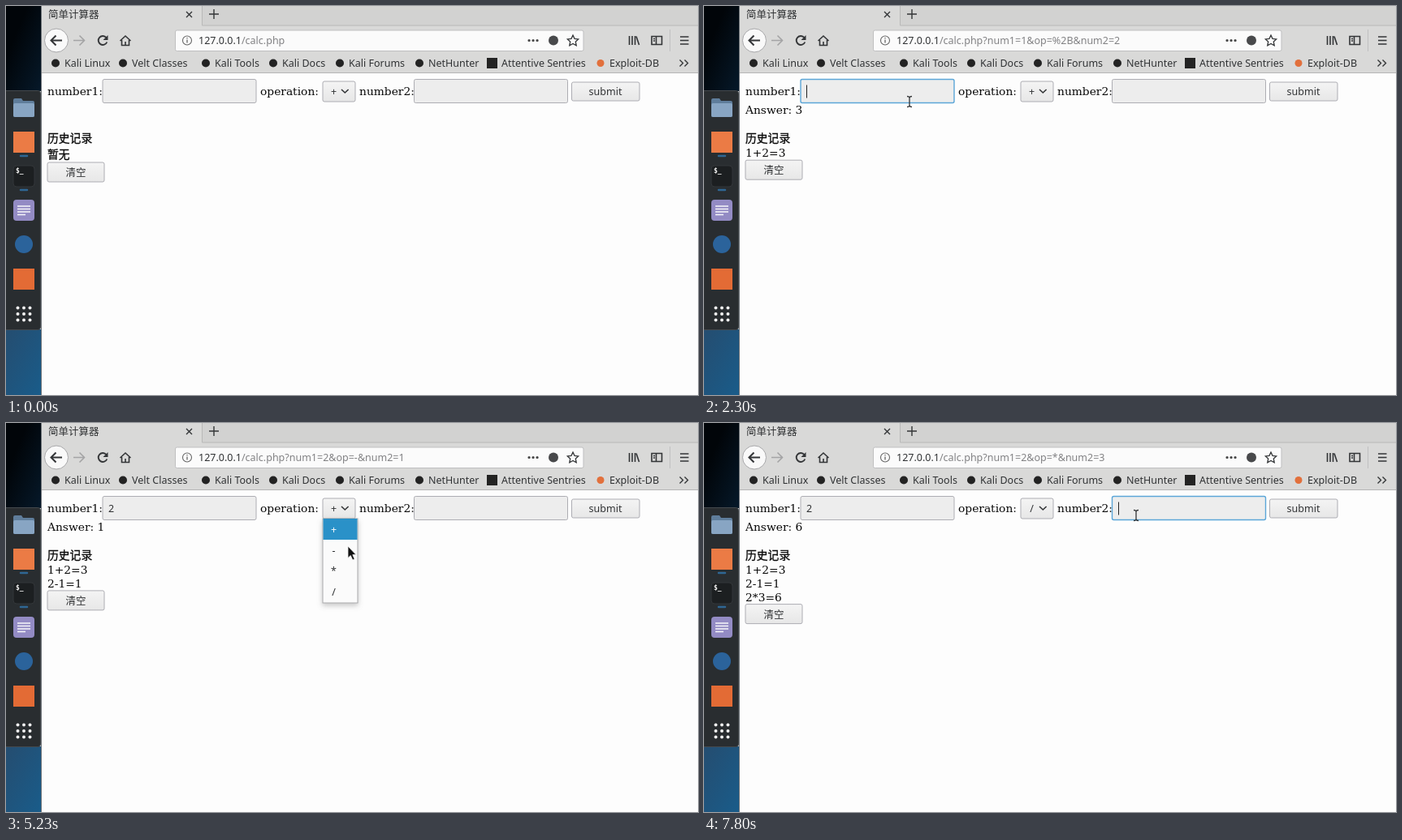
Recreate the animation shown at these times as an HTML page. Size 852 px wide and 480 px high, loop 8 s.

```html
<!DOCTYPE html>
<html lang="zh">
<head>
<meta charset="utf-8">
<title>简单计算器</title>
<style>
  html, body { margin: 0; width: 100%; height: 100%; overflow: hidden; background: #fdfdfd; }
  svg { display: block; width: 100vw; height: 100vh; }
  text { font: 12.5px "Noto Sans", "Noto Sans CJK SC", "Noto Sans CJK", sans-serif; fill: #303234; white-space: pre; }
  .page { font: 13.8px "DejaVu Serif", "Noto Sans CJK SC", "Noto Sans CJK", serif; fill: #080808; }
  .cjk { font: 13.8px "Noto Sans CJK SC", "Noto Sans CJK", sans-serif; fill: #080808; stroke: #080808; stroke-width: .3; }
  .mid { text-anchor: middle; }
  .line { fill: none; stroke: #333537; stroke-width: 1.6; }
  .box { fill: url(#btn); stroke: #adadb3; }
  .field { fill: #ededed; stroke: #adadb3; }
  .field.on { stroke: #5ba6d8; stroke-width: 1.4; }
  .caret { stroke: #222; stroke-width: 1; }
</style>
</head>
<body>
<svg viewBox="0 0 852 480" preserveAspectRatio="none">
  <defs>
    <linearGradient id="wall" x1="0" y1="0" x2="1" y2="1">
      <stop offset="0" stop-color="#254d70"/><stop offset="1" stop-color="#195c8a"/>
    </linearGradient>
    <linearGradient id="night" x1="0" y1="0" x2="1" y2="1">
      <stop offset=".3" stop-color="#010509"/><stop offset="1" stop-color="#06192a"/>
    </linearGradient>
    <linearGradient id="btn" x1="0" y1="0" x2="0" y2="1">
      <stop offset="0" stop-color="#f4f4f4"/><stop offset="1" stop-color="#e7e7e7"/>
    </linearGradient>
    <filter id="glow" x="-20%" y="-40%" width="140%" height="220%">
      <feDropShadow dx="0" dy="3" stdDeviation="3" flood-color="#777" flood-opacity=".4"/>
    </filter>
  </defs>

  <!-- desktop and dock -->
  <rect width="44" height="105" fill="url(#night)"/>
  <rect y="399" width="44" height="81" fill="url(#wall)"/>
  <rect x="-4" y="104.500" width="46.500" height="295" rx="3" fill="#292d30" stroke="#44494d"/>
  <path d="M9 116q0-2 2-2h8l2 3h12q2 0 2 2v16q0 2-2 2h-22q-2 0-2-2z" fill="#5f7d9b"/>
  <rect x="9" y="120" width="26" height="17" rx="2" fill="#88a5c3"/>
  <rect x="9" y="155" width="26" height="26" fill="#eb7b45"/>
  <rect x="9" y="197" width="26" height="26" rx="4" fill="#1c1f21" stroke="#33373a"/>
  <text x="12" y="206" style="font:bold 8px 'DejaVu Sans Mono',monospace;fill:#f2f2f2">$_</text>
  <path d="M18 185h8M18 227h8" stroke="#2f6794" stroke-width="2.500" stroke-linecap="round"/>
  <rect x="9" y="239" width="26" height="26" rx="4" fill="#938bc4"/>
  <path d="M14 247h16M14 250.500h16M14 254h16M14 257.500h10" stroke="#f7f7fa" stroke-width="1.700"/>
  <circle cx="22" cy="294" r="11" fill="#2b639b"/>
  <rect x="9" y="324" width="26" height="26" fill="#e36b35"/>
  <g id="dots" fill="#f1f1f1"></g>

  <!-- browser frame -->
  <rect x="44" width="808" height="480" fill="#fdfdfd"/>
  <rect x="44" width="808" height="82" fill="#d9d9d8"/>
  <rect x="241" width="611" height="24" fill="#d2d2d1"/>
  <path d="M241.500 0V24H852" fill="none" stroke="#b8b8b8"/>
  <path d="M44 82.500H852" stroke="#b5b5b5"/>
  <path d="M43.500 0V480" stroke="#6f7479"/>
  <circle id="busy" cy="10" r="1.700" fill="#444"/>
  <text id="title" y="14.500">简单计算器</text>
  <path class="line" d="M222 7l7 7m0-7l-7 7M250 10h12m-6-6v12" style="stroke-width:1.400"/>

  <circle cx="62" cy="42.500" r="14.500" fill="#f9f9f9" stroke="#a8a8aa"/>
  <path class="line" d="M69 42.500H56m5.500-6l-6 6 6 6" style="stroke-width:2"/>
  <path class="line" d="M83 42.500h13m-5.500-6l6 6-6 6" style="stroke:#a4a4a5"/>
  <g id="reload"><path class="line" d="M123.500 39a5.500 5.500 0 1 0 .8 5.500" style="stroke-width:1.900"/><path d="M125.500 36v6h-6z" fill="#333537"/></g>
  <path id="spin" class="line" d="M115.500 46.500a5.500 5.500 0 1 1 7 0" style="stroke:#666"/>
  <path class="line" d="M140.500 43l6.500-6 6.500 6M142.500 42v6.500h9V42M147 48v-4"/>
  <rect x="208.500" y="30" width="502.500" height="25.500" rx="2" fill="#fbfbfb" stroke="#bfbfc0"/>
  <circle class="line" cx="223" cy="42.500" r="5.500" style="stroke:#666;stroke-width:1.100"/>
  <path class="line" d="M223 41.500v4M223 39v1.300" style="stroke:#666;stroke-width:1.300"/>
  <text x="237" y="47">127.0.0.1<tspan id="url" fill="#828284"></tspan></text>
  <path d="M644 42.500h.1m4.900 0h.1m4.900 0h.1" stroke="#444" stroke-width="3.200" stroke-linecap="round"/>
  <circle cx="674" cy="42.500" r="6" fill="#48494b"/>
  <path class="line" d="M698 36l2 4.300 4.700.6-3.400 3.200.9 4.700-4.200-2.300-4.200 2.300.9-4.700-3.400-3.200 4.700-.6z" style="stroke-width:1.300"/>
  <path class="line" d="M767.500 37v11M771 37v11M774.500 37v11M776 37.500l3.500 10.500"/>
  <path class="line" d="M795 37.500h12.500v10H795zM800.500 37.500v10M797 40.500h2M797 43h2"/>
  <path d="M817.500 29v27" stroke="#c0c0c0"/>
  <path class="line" d="M830 38h10.500M830 42.500h10.500M830 47h10.500"/>
  <g id="marks"></g>
  <path class="line" d="M829.500 66.500l4 4-4 4m6-8l4 4-4 4" style="stroke-width:1.400"/>

  <!-- form -->
  <text class="page" x="51" y="110">number1:</text>
  <text class="page" x="313" y="110">operation:</text>
  <text class="page" x="435" y="110">number2:</text>
  <rect id="f1" class="field" x="119" y="90.500" width="189" height="29" rx="2"/>
  <rect id="f2" class="field" x="502.500" y="90.500" width="189" height="29" rx="2"/>
  <text id="v1" x="126" y="110"></text>
  <text id="v2" x="510" y="110"></text>
  <path id="caret" class="caret" d="M0 97.500v16"/>
  <rect class="box" x="390" y="93" width="40" height="25" rx="2"/>
  <rect id="ring" x="392.500" y="95.500" width="35" height="20" fill="none" stroke="#999" stroke-dasharray="1 1"/>
  <text id="op" class="mid" x="403.500" y="110"></text>
  <path class="line" d="M413 103l4.300 4 4.300-4"/>
  <rect class="box" x="696.500" y="94" width="83.500" height="23" rx="2"/>
  <text class="mid" x="738" y="110">submit</text>

  <!-- results -->
  <text id="answer" class="page" x="51" y="133"></text>
  <text class="cjk" x="51" y="168">历史记录</text>
  <text id="none" class="cjk" x="51" y="188">暂无</text>
  <g id="history"></g>
  <g id="clear">
    <rect class="box" x="51" y="0" width="70" height="24" rx="2"/>
    <text class="mid" x="86" y="17">清空</text>
  </g>

  <g id="hint">
    <rect x="502.500" y="120" width="189" height="21" fill="#fcfcfc" stroke="#c2c2c4" filter="url(#glow)"/>
    <text id="hintText" x="509" y="136"></text>
  </g>
  <g id="menu">
    <rect x="390" y="118" width="43" height="104" fill="#fbfbfb" stroke="#a9a9ab" filter="url(#glow)"/>
    <rect id="pick" x="390.500" width="42" height="26" fill="#2a91c8"/>
  </g>

  <path id="arrow" d="M0 0V14.500L3.300 11.500 5.800 17 8.200 16 5.800 10.600H10z" fill="#111" stroke="#f4f4f4" stroke-width=".8"/>
  <path id="beam" class="line" d="M-3-6.500q3 0 3 2 0-2 3-2M0-5v10M-3 6.500q3 0 3-2 0 2 3 2" style="stroke-width:1.300"/>
</svg>
<script>
const LOOP = 8000;
const OPS = ['+', '-', '*', '/'];
const $ = id => document.getElementById(id);

function add(parent, tag, attrs, text = '') {
  const node = document.createElementNS('http://www.w3.org/2000/svg', tag);
  for (const key in attrs) node.setAttribute(key, attrs[key]);
  node.textContent = text;
  return $(parent).appendChild(node);
}
const show = (id, on) => { $(id).style.display = on ? '' : 'none'; };
const place = (id, x, y) => $(id).setAttribute('transform', `translate(${x} ${y})`);

for (let i = 0; i < 9; i++)
  add('dots', 'circle', { cx: 14.5 + i % 3 * 7.5, cy: 372.5 + Math.floor(i / 3) * 7.5, r: 2 });

const bookmarks = [[72, 'Kali Linux'], [155, 'Velt Classes'], [257, 'Kali Tools'], [340, 'Kali Docs'],
  [422, 'Kali Forums'], [520, 'NetHunter'], [610, 'Attentive Sentries'], [743, 'Exploit-DB']];
bookmarks.forEach(([x, name], i) => {
  if (i === 6) add('marks', 'rect', { x: x - 18, y: 64, width: 13, height: 13, fill: '#232323' });
  else add('marks', 'circle', { cx: x - 11, cy: 70.5, r: i === 7 ? 4.5 : 5, fill: i === 7 ? '#e2703c' : '#232323' });
  add('marks', 'text', { x, y: 75 }, name);
});

const lines = ['1+2=3', '2-1=1', '2*3=6'].map((sum, i) =>
  add('history', 'text', { class: 'page', x: 51, y: 186 + 17 * i }, sum));
const rows = OPS.map((op, i) =>
  add('menu', 'text', { class: 'mid', x: 403.5, y: 136 + 25.7 * i }, op));

const answers = ['', 'Answer: 3', 'Answer: 1', 'Answer: 6'];
const queries = ['', '?num1=1&op=%2B&num2=2', '?num1=2&op=-&num2=1', '?num1=2&op=*&num2=3'];

const blank = { a: '', b: '', op: '+', focus: '', hint: '', open: false };
const steps = [[0, { ...blank, count: 0, url: 0, busy: false }]];
const at = (time, patch) => steps.push([time, patch]);

function fillFirst(click, type, value) {
  at(click, { focus: 'a' });
  at(type, { a: value });
}
function choose(open, pick, op) {
  at(open, { open: true, focus: 'op' });
  at(pick, { open: false, op });
}
function fillSecond(click, type, value) {
  at(click, { focus: 'b' });
  at(type, { b: value, hint: value });
}
function submit(click, page, done, count) {
  at(click, { busy: true, hint: '', focus: '' });
  at(page, { ...blank, count });
  at(done, { busy: false, url: count });
}

fillFirst(400, 600, '1');
fillSecond(880, 1080, '2');
submit(1400, 1440, 1510, 1);
fillFirst(2200, 2560, '2');
choose(2860, 3200, '-');
fillSecond(3680, 3860, '1');
submit(4190, 4270, 4340, 2);
fillFirst(4640, 4800, '2');
choose(5100, 5420, '*');
fillSecond(5700, 5880, '3');
submit(6200, 6260, 6330, 3);
fillFirst(6680, 6900, '2');
choose(7080, 7370, '/');
at(7770, { focus: 'b' });

// Pointer stops: time, x, y
const path = [
  [30, 560, 300], [400, 215, 112], [600, 215, 112], [880, 560, 112], [1080, 560, 112],
  [1380, 749, 107], [1540, 749, 107], [2180, 253, 118], [2560, 253, 118], [2850, 411, 106],
  [2880, 411, 106], [3170, 411, 157], [3220, 411, 157], [3530, 506, 124], [3680, 540, 112],
  [3860, 540, 112], [4160, 738, 108], [4300, 738, 108], [4630, 250, 113], [4800, 250, 113],
  [5030, 411, 106], [5100, 411, 106], [5230, 421, 152], [5420, 414, 183], [5680, 545, 112],
  [5880, 545, 112], [6070, 714, 109], [6180, 735, 108], [6340, 735, 108], [6680, 250, 113],
  [6900, 250, 113], [7070, 411, 106], [7350, 411, 208], [7600, 411, 208], [7760, 532, 114]
];

function pointer(time) {
  const i = path.findIndex(p => p[0] > time);
  if (i < 1) return (i ? path[path.length - 1] : path[0]).slice(1);
  const [t0, x0, y0] = path[i - 1], [t1, x1, y1] = path[i];
  const u = (time - t0) / (t1 - t0), k = u * u * (3 - 2 * u);
  return [x0 + (x1 - x0) * k, y0 + (y1 - y0) * k];
}

function draw(time) {
  const s = {};
  for (const [when, patch] of steps) if (when <= time) Object.assign(s, patch);

  $('v1').textContent = s.a;
  $('v2').textContent = s.b;
  $('op').textContent = s.op;
  $('f1').classList.toggle('on', s.focus === 'a');
  $('f2').classList.toggle('on', s.focus === 'b');
  show('ring', s.focus === 'op' && !s.open);
  const typing = s.focus === 'a' || s.focus === 'b';
  show('caret', typing);
  if (typing) place('caret', (s.focus === 'a' ? 126.5 : 510.5) + s[s.focus].length * 7.5, 0);

  $('answer').textContent = answers[s.count];
  show('none', !s.count);
  lines.forEach((line, i) => { line.style.display = i < s.count ? '' : 'none'; });
  place('clear', 0, s.count ? 173.5 + 16.7 * s.count : 193);
  $('url').textContent = '/calc.php' + queries[s.url];

  show('hint', s.hint);
  $('hintText').textContent = s.hint;
  show('busy', s.busy);
  show('spin', s.busy);
  show('reload', !s.busy);
  $('title').setAttribute('x', s.busy ? 71 : 52);
  $('busy').setAttribute('cx', 57 + 4 * Math.sin((time - 1470) / 90));

  show('menu', s.open);
  if (s.open) {
    const row = Math.max(0, Math.min(3, Math.floor((pointer(time - 100)[1] - 118) / 26)));
    $('pick').setAttribute('y', 118 + 26 * row);
    rows.forEach((node, i) => { node.style.fill = i === row ? '#fcfcfc' : ''; });
  }

  const [x, y] = pointer(time);
  const inField = y > 90 && y < 120 && (x > 119 && x < 308 || x > 502 && x < 692);
  show('arrow', time >= 30 && !inField);
  show('beam', time >= 30 && inField);
  place('arrow', x, y);
  place('beam', x, y);
}

const start = performance.now();
function tick() {
  draw((performance.now() - start) % LOOP);
  requestAnimationFrame(tick);
}
tick();
</script>
</body>
</html>
```
